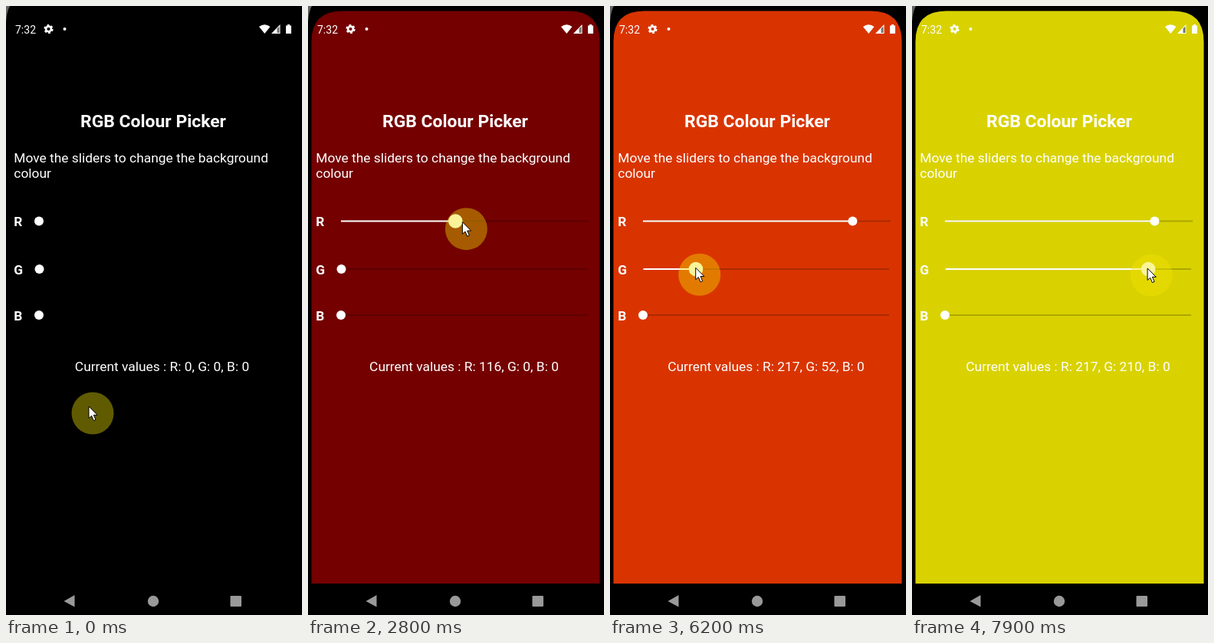
Animation of 386 by 794 pixels, one loop 8000 ms. Source, as an HTML page:

```html
<!DOCTYPE html>
<html lang="en">
<head>
<meta charset="utf-8">
<title>RGB Colour Picker</title>
<style>
  html, body { margin: 0; width: 100%; height: 100%; overflow: hidden; background: #000; }
  svg { display: block; width: 100%; height: 100%; }
  text { font: 17.36px Roboto, sans-serif; fill: #fff; }
  .bold { font-weight: 700; }
  .title { font-size: 22.9px; }
  .clock { font-size: 14px; }
  .icon { fill: #fff; }
  .nav { fill: #999; }
</style>
</head>
<body>
<svg viewBox="0 0 386 794">
  <rect width="386" height="794"/>
  <path d="M0 0H5Q1 7 0 21Z" fill="#666"/>
  <path id="screen" d="M4.500 753V46.500Q4.500 6.500 44.500 6.500H340.500Q380.500 6.500 380.500 46.500V753Z"/>

  <text class="clock" x="12" y="35.500">7:32</text>
  <g fill="none" stroke="#fff">
    <circle cx="55.500" cy="30" r="3.400" stroke-width="2.600"/>
    <circle cx="55.500" cy="30" r="5.100" stroke-width="2" stroke-dasharray="2.800 2.540"/>
  </g>
  <circle class="icon" cx="76.500" cy="30" r="2"/>
  <path class="icon" d="M330 27Q337.300 21.500 344.500 27L337.300 36Z"/>
  <path class="icon" d="M346 36L357.500 24V36Z"/>
  <path d="M353.500 29.500L356.500 26.500V35H353.500Z" opacity=".55"/>
  <path class="icon" d="M365 25.500H367V24H370V25.500H372V36H365Z"/>

  <text class="bold title" x="192" y="158" text-anchor="middle">RGB Colour Picker</text>
  <text x="10.300" y="204">Move the sliders to change the background</text>
  <text x="10.300" y="224">colour</text>
  <g id="sliders"></g>
  <text id="values" x="203.500" y="476" text-anchor="middle"></text>

  <path class="nav" d="M75.500 776L89.500 768V783.500Z"/>
  <circle class="nav" cx="192" cy="776" r="7.200"/>
  <rect class="nav" x="292.500" y="769" width="14.500" height="14" rx="1"/>

  <circle id="halo" cx="5" cy="9" r="27.500" fill="#f0e400" opacity=".4"/>
  <circle id="ring" fill="none" stroke="#dc5c00" stroke-width="2.500"/>
  <path id="arrow" d="M0 0V15.500L3.600 12.300L6.300 18.600L9 17.400L6.300 11.300H11.200Z" fill="#fff" stroke="#000"/>
</svg>
<script>
const LOOP = 8000, STEP = 100, LEAD = 25, SCALE = 1.26;
const $ = id => document.getElementById(id);
const clamp = u => Math.min(1, Math.max(0, u));
const mix = (a, b, u) => a + (b - a) * u;
const smooth = u => u * u * (3 - 2 * u);

// Each drag runs from one time to another; tilt and bend shape its speed,
// gap is how far the pointer ends up from the thumb.
const red = { name: 'R', x: 43, y: 280.5, end: 366, from: 1500, to: 4600,
  max: 217, tilt: -0.132, bend: 1.443, gap: { x: 17, y: 6 } };
const green = { name: 'G', x: 43.5, y: 343, end: 364, from: 5700, to: 7900,
  max: 210, tilt: 0.22, bend: -0.458, gap: { x: -1, y: 1 } };
const blue = { name: 'B', x: 43, y: 403, end: 364, from: LOOP, to: LOOP + 1,
  max: 0, tilt: 0, bend: 0, gap: { x: 0, y: 0 } };
const sliders = [red, green, blue];

function progress(s, t) {
  const u = clamp((t - s.from) / (s.to - s.from));
  return u + u * (1 - u) * (s.tilt + s.bend * u);
}

const value = (s, t) => s.max * progress(s, t);
const thumbX = (s, t) => s.x + SCALE * value(s, t + LEAD);

function grip(s, t) {
  const p = progress(s, t);
  return { x: thumbX(s, t) + s.gap.x * p, y: s.y - 2 + s.gap.y * p };
}

function glide(a, b, u, bow) {
  const k = smooth(u), arc = Math.sin(Math.PI * u);
  return { x: mix(a.x, b.x, k) + bow.x * arc, y: mix(a.y, b.y, k) + bow.y * arc };
}

function pointer(t) {
  if (t < 900) return glide({ x: 108, y: 522 }, grip(red, t), t / 900, { x: -15, y: 0 });
  if (t < 4700) return grip(red, t);
  return glide(grip(red, t), grip(green, t), clamp((t - 4700) / 700), { x: 0, y: 25 });
}

function set(el, attrs) {
  for (const key in attrs) el.setAttribute(key, attrs[key]);
}

function add(tag, attrs) {
  const el = document.createElementNS('http://www.w3.org/2000/svg', tag);
  set(el, attrs);
  return $('sliders').appendChild(el);
}

for (const s of sliders) {
  add('text', { class: 'bold', x: 10.3, y: Math.floor(s.y) + 7 }).textContent = s.name;
  add('path', { d: `M${s.x} ${s.y}H${s.end}`, stroke: '#000', 'stroke-width': 2, opacity: 0.2 });
  s.bar = add('path', { stroke: '#fff', 'stroke-width': 2.2 });
  s.thumb = add('circle', { cy: s.y, fill: '#fff' });
}

function draw(t) {
  const rgb = sliders.map(s => Math.round(value(s, t)));
  set($('screen'), { fill: `rgb(${rgb})` });
  $('values').textContent =
    'Current values : ' + sliders.map((s, i) => `${s.name}: ${rgb[i]}`).join(', ');

  for (const s of sliders) {
    const x = thumbX(s, t);
    const pressed = t > s.from && t < s.to + 200;
    set(s.bar, { d: `M${s.x} ${s.y}H${x}` });
    set(s.thumb, { cx: x, r: pressed ? 9.3 : 6 });
  }

  const clicked = sliders.find(s => t >= s.from && t < s.from + 200);
  const age = clicked ? (t - clicked.from) / 200 : 1;
  set($('ring'), { opacity: 1 - age, r: 10 + 12 * age });
  if (clicked) set($('ring'), { cx: clicked.x - 1, cy: clicked.y });

  const tip = pointer(t);
  for (const id of ['halo', 'arrow']) set($(id), { transform: `translate(${tip.x} ${tip.y})` });
}

const start = performance.now();
function frame() {
  const t = (performance.now() - start) % LOOP;
  draw(Math.floor(t / STEP) * STEP);
  requestAnimationFrame(frame);
}
frame();
</script>
</body>
</html>
```
